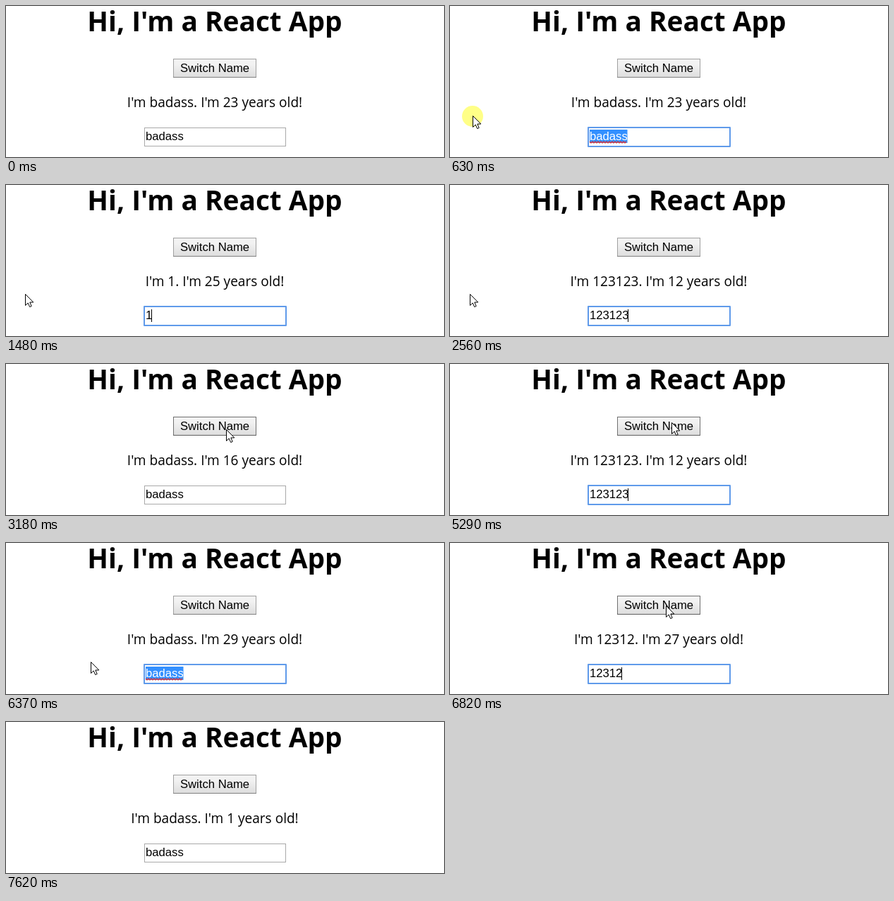
An HTML page with a canvas that plays this animation: 621x215 px, repeating every 8.21 s.

```html
<!DOCTYPE html>
<html lang="en">
<head>
<meta charset="utf-8">
<title>React App</title>
<style>
  html, body { margin: 0; width: 100%; height: 100%; overflow: hidden; background: #fff; }
  canvas { display: block; }
</style>
</head>
<body>
<canvas id="stage" width="621" height="215"></canvas>
<script>
const ctx = document.getElementById('stage').getContext('2d', { alpha: false });
const HEADING = 'bold 38.8px "Open Sans", sans-serif';
const BODY = '19.05px "Open Sans", sans-serif';
const CONTROL = '16.67px "Liberation Sans", Arial, sans-serif';
const CENTER = 296, TEXT_X = 198;
const NAME = 'badass', DIGITS = '123123', FIRST_AGE = 23;

const LOOP = 8210, ENTER = 70, EXIT = 7620;
const APPROACH = 233, DRAG = 390, TRAVEL = 460, CLICK = 100;
const CORNER = [480, 186], GRAB = [266, 187];

// Each round: drag over the word, type digits, then click the button.
const rounds = [
  { press: 300, release: 930, dragTo: [27, 156], type: 1480, every: 152, keys: 6,
    leave: 2560, button: [312, 94], click: 3020, clickAge: 16 },
  { press: 4105, release: 4340, dragTo: [126, 190], type: 4530, every: 120, keys: 6,
    leave: 4340, button: [314, 84], click: 5345, clickAge: 29 },
  { press: 5895, release: 6205, dragTo: [120, 170], type: 6510, every: 77, keys: 5,
    leave: 6440, button: [312, 88], click: 7255, clickAge: 1 }
];

const legs = rounds.flatMap(r => [
  { start: r.press - APPROACH, end: r.press, to: GRAB },
  { start: r.press, end: Math.min(r.release, r.press + DRAG), to: r.dragTo },
  { start: r.leave, end: r.leave + TRAVEL, to: r.button }
]);
legs.push({ start: EXIT - 300, end: EXIT, to: CORNER });

const easeOut = k => 1 - (1 - k) ** 2;
const typedAge = key => (25 + 16 * key) % 31;

function pointerAt(t) {
  let [x, y] = CORNER;
  for (const { start, end, to } of legs) {
    if (t <= start) break;
    const k = easeOut(Math.min(1, (t - start) / (end - start)));
    x += (to[0] - x) * k;
    y += (to[1] - y) * k;
  }
  return [Math.round(x), Math.round(y)];
}

function stateAt(t) {
  const index = rounds.filter(r => t >= r.press).length - 1;
  if (index < 0) return { value: NAME, age: FIRST_AGE };
  const r = rounds[index];
  const dragging = t < r.release;
  const clicking = t >= r.click && t < r.click + CLICK;
  if (t >= r.click + CLICK) return { value: NAME, age: r.clickAge };
  const keys = Math.min(r.keys, Math.max(0, Math.floor((t - r.type) / r.every) + 1));
  return {
    value: keys ? DIGITS.slice(0, keys) : NAME,
    age: keys ? typedAge(keys - 1) : index ? rounds[index - 1].clickAge : FIRST_AGE,
    focused: t < r.click, dragging, clicking
  };
}

function rect(x, y, w, h, color) {
  ctx.fillStyle = color;
  ctx.fillRect(x, y, w, h);
}

function text(str, x, y, font, color = '#000', align = 'left') {
  ctx.font = font;
  ctx.fillStyle = color;
  ctx.textAlign = align;
  ctx.fillText(str, x, y);
}

function drawButton(hover, pressed) {
  const fill = ctx.createLinearGradient(0, 75, 0, 102);
  fill.addColorStop(0.3, pressed ? '#e5e5e5' : '#f2f2f2');
  fill.addColorStop(1, pressed ? '#d5d5d5' : '#dcdcdc');
  rect(237, 75, 118, 27, hover ? '#707070' : '#a0a0a0');
  rect(237, 101, 118, 1, hover ? '#606060' : '#808080');
  rect(238, 76, 116, 25, fill);
  text('Switch Name', CENTER, 94, CONTROL, '#000', 'center');
}

function squiggle(x, end, y) {
  ctx.strokeStyle = '#e03030';
  ctx.lineWidth = 1.2;
  ctx.beginPath();
  ctx.moveTo(x, y);
  for (let i = 1; x + i * 2 <= end; i++) ctx.lineTo(x + i * 2, y + (i % 2 ? 2 : 0));
  ctx.stroke();
}

function drawInput({ value, focused, dragging }, pointerX) {
  rect(196, 173, 201, 27, '#a9a9a9');
  rect(197, 174, 199, 25, '#fff');
  text(value, TEXT_X, 191, CONTROL);
  if (!focused) return;

  ctx.strokeStyle = '#5f9aea';
  ctx.lineWidth = 2;
  ctx.lineJoin = 'round';
  ctx.strokeRect(196, 173, 201, 27);

  const end = TEXT_X + ctx.measureText(value).width;
  if (value !== NAME) {
    rect(Math.floor(end) - 1, 177, 1, 18, '#000');
    return;
  }
  // The selection grows from the end of the word towards the pointer.
  const from = dragging ? Math.min(end, Math.max(TEXT_X, pointerX)) : TEXT_X;
  ctx.save();
  ctx.beginPath();
  ctx.rect(from, 176, end - from, 19);
  ctx.clip();
  rect(from, 176, end - from, 19, '#3390ff');
  text(value, TEXT_X, 191, CONTROL, '#fff');
  ctx.restore();
  squiggle(TEXT_X, end, 193);
}

const arrow = new Path2D('M.5 -.5V15.5L4.2 12 6.7 17.6 9.2 16.5 6.8 11H11.8Z');
const beam = new Path2D('M-3 -8H-1L0 -7 1 -8H3M0 -7V7M-3 8H-1L0 7 1 8H3');

function drawPointer(x, y, pressed) {
  if (pressed) {
    ctx.fillStyle = 'rgba(255,255,0,.47)';
    ctx.beginPath();
    ctx.arc(x, y, 15, 0, Math.PI * 2);
    ctx.fill();
  }
  const overInput = x > 196 && x < 397 && y > 173 && y < 200;
  ctx.save();
  ctx.translate(x, y);
  ctx.lineWidth = 1;
  ctx.strokeStyle = '#000';
  ctx.fillStyle = '#fff';
  if (!overInput) ctx.fill(arrow);
  ctx.stroke(overInput ? beam : arrow);
  ctx.restore();
}

function draw(t) {
  const state = stateAt(t);
  const visible = t >= ENTER && t < EXIT;
  const [x, y] = pointerAt(t);
  const hover = visible && x >= 237 && x < 355 && y >= 75 && y < 102;

  rect(0, 0, 621, 215, '#fff');
  text("Hi, I'm a React App", CENTER, 36, HEADING, '#000', 'center');
  drawButton(hover, state.clicking);
  text(`I'm ${state.value}. I'm ${state.age} years old!`, CENTER, 144, BODY, '#000', 'center');
  drawInput(state, x);
  if (visible) drawPointer(x, y, state.dragging || state.clicking);
}

const began = performance.now();
function frame() {
  draw((performance.now() - began) % LOOP);
  requestAnimationFrame(frame);
}
frame();
</script>
</body>
</html>
```
